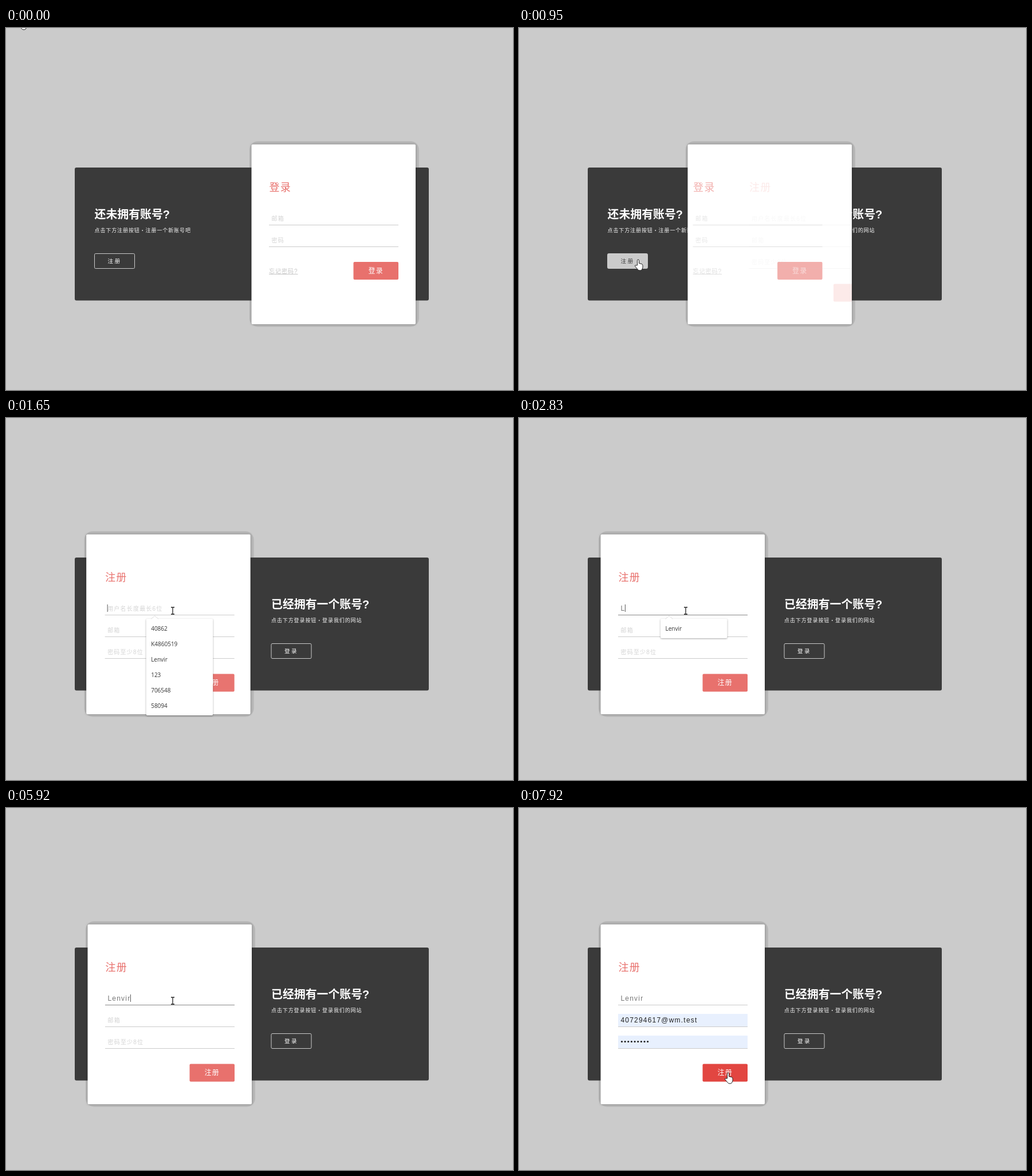
An HTML page with a canvas that plays this animation: 885 px wide and 633 px high, repeating every 8 s.

```html
<!DOCTYPE html>
<html lang="zh-CN">
<head>
<meta charset="utf-8">
<title>登录 / 注册</title>
<style>
html, body { margin: 0; width: 100%; height: 100%; overflow: hidden; background: #cbcbcb; }
canvas { display: block; }
</style>
</head>
<body>
<canvas id="stage" width="885" height="633"></canvas>
<script>
const ctx = document.getElementById('stage').getContext('2d');
const LOOP = 8000;
const SANS = '"Liberation Sans", "Noto Sans CJK SC", "Noto Sans CJK", sans-serif';
const MENU = '"Open Sans", "Noto Sans CJK TC", "Noto Sans CJK", sans-serif';
const DARK = '#3a3a3a', RED = '#e8716d', LINE = '#cbcbcb', HINT = '#d3d3d3', FILL = '#e8f0fe';
const NAME = 'Lenvir', MAIL = '407294617@wm.test';
const SUGGESTIONS = ['40862', 'K4860519', NAME, '123', '706548', '58094'];

// The screen refreshes in bursts: [first, last, count]
const BURSTS = [
  [0, 0, 1], [90, 860, 10], [950, 1730, 10], [1810, 1890, 2], [2150, 2150, 1],
  [2650, 2830, 3], [3000, 3000, 1], [3160, 3160, 1], [3750, 3750, 1], [3910, 3910, 1],
  [4160, 4160, 1], [4410, 4410, 1], [4580, 4580, 1], [4750, 4750, 1], [4910, 5080, 3],
  [5410, 5410, 1], [5920, 6170, 4], [6330, 6840, 7], [7000, 7590, 8], [7840, 7920, 2]
];
const TICKS = BURSTS.flatMap(([a, b, n]) => Array.from({ length: n }, (_, i) =>
  n > 1 ? Math.floor((a + (b - a) * i / (n - 1) + 0.01) / 10) * 10 : a));

const CURSOR = [
  [0, 28, -16], [90, 40, 25], [430, 150, 300], [690, 203, 409], [860, 204, 409],
  [950, 208, 405], [1120, 279, 354], [1300, 291, 337], [5920, 291, 337], [6170, 301, 372],
  [6420, 301, 373], [6840, 337, 414], [7000, 337, 414], [7420, 363, 460], [7590, 365, 463]
];
const SLIDE = [[827, 0], [860, 33], [1120, 316], [1650, 818], [1840, 1000]];
const TYPING = [[2650, 1], [3000, 2], [4410, 3], [4580, 4], [4750, 5], [4910, 6]];
const CARET_OFF = [[2150, 2650], [3750, 4160], [5410, 5920]];

const clamp = v => Math.max(0, Math.min(1, v));
const within = (t, a, b) => t >= a && t < b;

function track(t, keys) {
  const i = keys.findIndex(k => k[0] > t);
  if (i === 0) return keys[0].slice(1);
  if (i < 0) return keys[keys.length - 1].slice(1);
  const a = keys[i - 1], b = keys[i], p = (t - a[0]) / (b[0] - a[0]);
  return a.slice(1).map((v, j) => v + (b[j + 1] - v) * p);
}

// CSS "ease"
function ease(x) {
  x = clamp(x);
  let lo = 0, hi = 1;
  const curve = (s, a, b) => 3 * (1 - s) * (1 - s) * s * a + 3 * (1 - s) * s * s * b + s * s * s;
  for (let i = 0; i < 24; i++) {
    const mid = (lo + hi) / 2;
    if (curve(mid, 0.25, 0.25) < x) lo = mid; else hi = mid;
  }
  return curve(lo, 0.1, 1);
}

function mix(from, to, p) {
  return `rgb(${from.map((v, i) => Math.round(v + (to[i] - v) * clamp(p)))})`;
}

function text(str, x, y, size, color, { gap = 0, weight = 400, family = SANS } = {}) {
  ctx.font = `${weight} ${size}px ${family}`;
  ctx.letterSpacing = gap + 'px';
  ctx.fillStyle = color;
  ctx.fillText(str, x, y + size * 0.37);
  return ctx.measureText(str).width;
}

function box(x, y, w, h, r, fill, stroke) {
  ctx.beginPath();
  ctx.roundRect(x, y, w, h, r);
  if (fill) { ctx.fillStyle = fill; ctx.fill(); }
  if (stroke) { ctx.strokeStyle = stroke; ctx.lineWidth = 1; ctx.stroke(); }
}

function rule(x, y, w, color) {
  ctx.fillStyle = color;
  ctx.fillRect(x, y, w, 1);
}

function disc(x, y, r, color) {
  ctx.beginPath();
  ctx.arc(x, y, r, 0, Math.PI * 2);
  ctx.fillStyle = color;
  ctx.fill();
}

function dots(x, y, step, r) {
  for (let i = 0; i < 9; i++) disc(x + i * step, y, r, '#222');
}

function shaded(blur, dy, alpha, draw) {
  ctx.save();
  ctx.shadowColor = `rgba(0,0,0,${alpha})`;
  ctx.shadowBlur = blur;
  ctx.shadowOffsetY = dy;
  draw();
  ctx.restore();
}

function panelSide(x, title, note, label, hover) {
  text(title, x, 326, 19.9, '#fff', { weight: 700 });
  text(note, x, 354, 9, '#f4f4f4', { gap: 0.9 });
  box(x, 394.5, 70, 26, 2, hover ? LINE : null, LINE);
  text(label, x + 23, 407, 9.6, hover ? DARK : '#fff', { gap: 2.4, weight: 500 });
}

function button(y, label, color) {
  box(178, y, 78.5, 31, 2, color);
  text(label, 204, y + 15.5, 12, '#fff', { gap: 1.2 });
}

function heading(label) {
  text(label, 31, 278, 18, RED, { gap: 1.2, weight: 300 });
}

function hint(label, y) {
  text(label, 35, y, 10, HINT, { gap: 1.2 });
}

function loginForm() {
  heading('登录');
  ['邮箱', '密码'].forEach((label, i) => {
    hint(label, 333 + i * 38);
    rule(30.5, 344 + i * 38, 226, LINE);
  });
  const w = text('忘记密码?', 30.5, 425, 10, '#c6c6c6', { gap: 1 });
  rule(30.5, 430, w, '#c6c6c6');
  button(409, '登录', RED);
}

function signupForm(t, state) {
  const { typed, preview, filled } = state;
  heading('注册');
  const nameFocus = within(t, 1700, 6330);
  const mailFocus = t < 6330 ? 0 : 1 - clamp((t - 7780) / 140);
  if (preview || filled) {
    box(30.5, 360, 226, 22, 0, FILL);
    box(30.5, 398, 226, 22, 0, FILL);
    text(MAIL, 35, 371, filled ? 12 : 10, '#222', { gap: 1.2 });
    if (filled) dots(37, 408.5, 5.65, 1.6);
    else dots(37, 409, 4.85, 1.3);
  } else {
    hint('邮箱', 371);
    hint('密码至少8位', 409);
  }
  let end = 35;
  if (typed) end += text(NAME.slice(0, typed), 35, 332.5, 12, '#777', { gap: 1.2 });
  else hint('用户名长度最长6位', 333);
  const blink = CARET_OFF.some(([a, b]) => within(t, a, b));
  if (within(t, 1560, 6330) && !blink) box(end - 0.5, 326, 1, 13, 0, '#555');
  rule(30.5, 344, 226, nameFocus ? '#888' : LINE);
  rule(30.5, 382, 226, mix([203, 203, 203], [136, 136, 136], mailFocus));
  rule(30.5, 420, 226, LINE);
  button(447.5, '注册', mix([232, 113, 109], [226, 70, 65], (t - 7300) / 280));
}

function popup(x, y, w, h) {
  shaded(3, 1, 0.35, () => box(x, y, w, h, 2, '#fff'));
  ctx.beginPath();
  ctx.moveTo(x + 8.5, y + 0.5);
  ctx.lineTo(x + 15, y - 5);
  ctx.lineTo(x + 21.5, y + 0.5);
  ctx.fillStyle = '#fff';
  ctx.fill();
  ctx.strokeStyle = '#ddd';
  ctx.lineWidth = 1;
  ctx.stroke();
}

function suggestions(x, items) {
  popup(x, 351, 116.5, 7 + items.length * 27);
  items.forEach((item, i) => text(item, x + 8.5, 368 + i * 27, 10, '#333', { family: MENU }));
}

function passwordMenu(x, hover) {
  popup(x, 390, 152, 84);
  if (hover) box(x, 394, 152, 43, 0, '#e8e8e8');
  disc(x + 14.5, 415, 6, '#7fd4ee');
  text(MAIL, x + 30, 407, 10.4, '#333', { family: MENU });
  dots(x + 32.5, 423.5, 4.4, 1.6);
  rule(x, 440, 152, '#ddd');
  disc(x + 14.5, 457, 5.5, '#5a5a5a');
  text('管理密碼...', x + 30, 457, 10, '#666', { family: MENU });
  disc(x + 133, 457, 3.5, '#4a80e0');
}

const ARROW = new Path2D('M0 0V13L3 10.3L5.2 14.5L7.3 13.5L5.3 9.5H9Z');
const HAND = new Path2D('M-1.5 10V1.5a1.5 1.5 0 0 1 3 0V6.5l4.5 1q2 .6 2 3v3.500l-1.300 3q-.5 2-3.500 2t-4-2L-5.500 11.500q-.3-2.300 1.800-1.500z');
const BEAM = new Path2D('M-3 -6H-1Q0 -6 0 -5Q0 -6 1 -6H3M0 -5V5M-3 6H-1Q0 6 0 5Q0 6 1 6H3');

function pointer(x, y, kind) {
  ctx.save();
  ctx.translate(x, y);
  ctx.lineWidth = kind === BEAM ? 1.3 : 1;
  ctx.strokeStyle = '#222';
  ctx.fillStyle = '#fff';
  if (kind !== BEAM) ctx.fill(kind);
  ctx.stroke(kind);
  ctx.restore();
}

function cardLeft(ms) {
  return ms < 500 ? 428.5 - 308.5 * ease(ms / 500) : 120 + 22.5 * ease((ms - 500) / 500);
}

function draw(t) {
  const [slide] = track(t, SLIDE);
  const left = cardLeft(slide);
  const [cx, cy] = track(t, CURSOR);
  const overJoin = t < 1000 && within(cx, 154, 225) && within(cy, 394, 421);
  const menuOpen = within(t, 6330, 7000);
  const menuHover = menuOpen && cy >= 394;
  const typed = TYPING.reduce((n, [at, count]) => t >= at ? count : n, 0);

  ctx.fillStyle = '#cbcbcb';
  ctx.fillRect(0, 0, 885, 633);
  box(left - 3.5, 198, 296, 324.5, 15, '#b8b8b8');
  box(120, 244, 618, 232.5, 3, DARK);
  panelSide(154.5, '还未拥有账号?', '点击下方注册按钮・注册一个新账号吧', '注册', overJoin);
  panelSide(463, '已经拥有一个账号?', '点击下方登录按钮・登录我们的网站', '登录', false);

  shaded(4, 0, 0.3, () => box(left, 203.5, 286.5, 314.5, 2, '#fff'));
  ctx.save();
  ctx.beginPath();
  ctx.rect(left, 203.5, 286.5, 314.5);
  ctx.clip();
  const loginAlpha = 1 - ease(slide / 500);
  if (loginAlpha > 0.002) {
    ctx.save();
    ctx.globalAlpha = loginAlpha;
    ctx.translate(left - 89.8 * ease(slide / 750), 0);
    loginForm();
    ctx.restore();
  }
  if (slide > 0) {
    const shown = ease(slide / 1000);
    ctx.globalAlpha = shown;
    ctx.translate(left + 89.8 * (1 - shown), 0);
    signupForm(t, { typed, preview: menuHover, filled: t >= 7000 });
  }
  ctx.restore();

  if (within(t, 1600, 4910)) suggestions(left + 104.5, typed ? [NAME] : SUGGESTIONS);
  if (menuOpen) passwordMenu(left + 104.5, menuHover);

  const overSubmit = t > 7000 && cy >= 447.5;
  const overField = within(t, 1200, 6500) && (within(cy, 322, 345) || within(cy, 360, 383));
  pointer(cx, cy, t < 90 || overJoin || overSubmit ? HAND : overField ? BEAM : ARROW);
}

function frame() {
  const now = performance.now() % LOOP;
  draw(TICKS.findLast(tick => tick <= now) || 0);
  requestAnimationFrame(frame);
}
frame();
</script>
</body>
</html>
```
